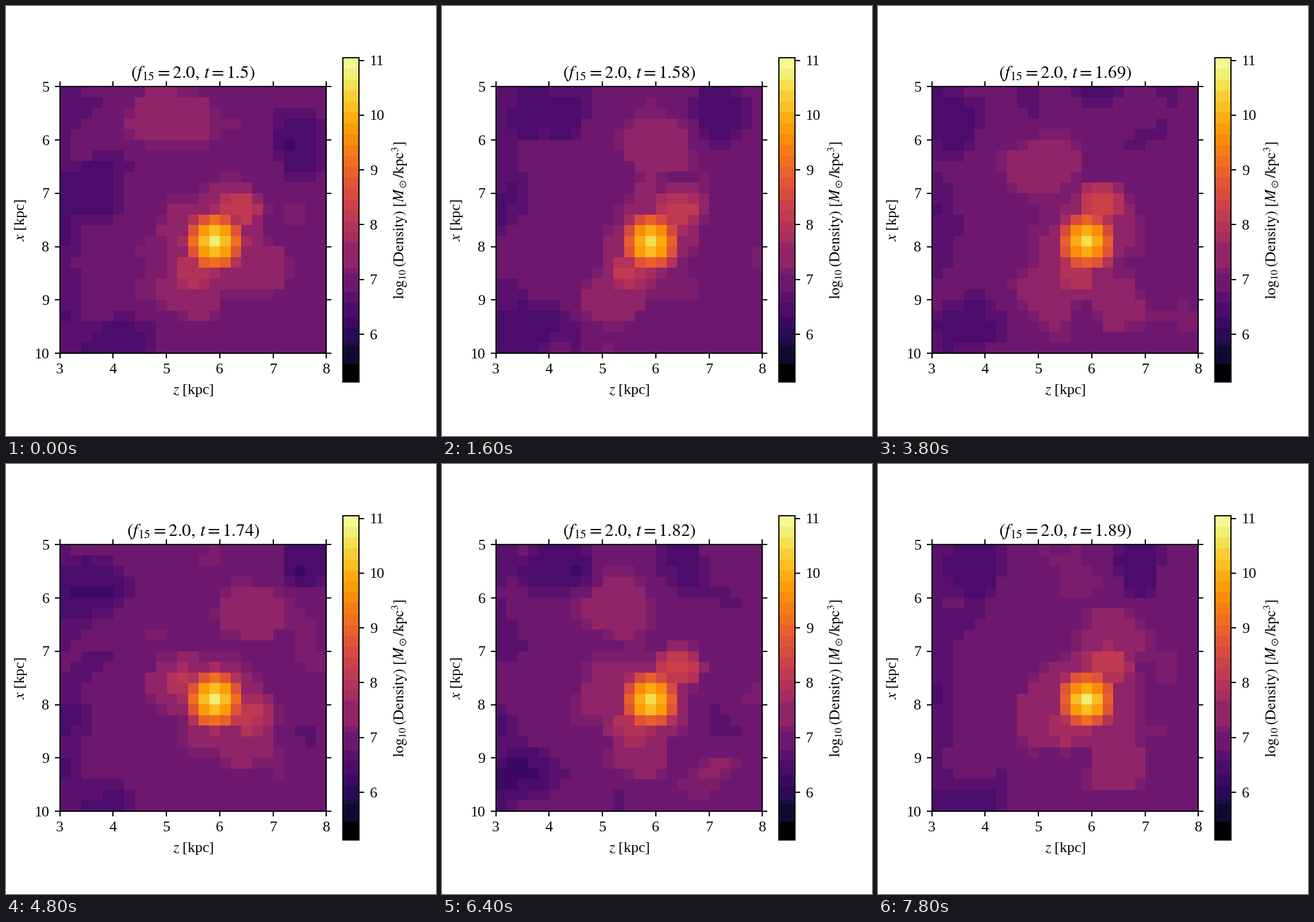
Write a matplotlib script that moves like this. It is 748 by 748 pixels and loops after 8 s.

```python
import numpy as np
import matplotlib.pyplot as plt
from matplotlib.animation import FuncAnimation
from matplotlib.colors import BoundaryNorm, ListedColormap

SIDE, DPI, FRAMES, STEP_MS = 748, 187, 40, 200
N, AMBIENT = 25, 6.94
CORE_Z, CORE_X = 5.9, 7.91

plt.rcParams.update({
    "font.family": "Liberation Serif",
    "mathtext.fontset": "stix",
    "font.size": 10,
})

# Moments at which the drifting structures pass their key points
KEYS = [0, 4, 12, 19, 24, 32, 39]
SPUR_ANGLE = [55, 35, 65, 70, -25, 50, 60]


class Drifter:
    """A flat-topped clump (+) or void (-) that follows a path of (z, x) points."""

    def __init__(self, amp, rz, rx, path):
        self.amp, self.rz, self.rx = amp, rz, rx
        self.z, self.x = zip(*path)

    def field(self, k):
        z, x = np.interp(k, KEYS, self.z), np.interp(k, KEYS, self.x)
        return lobe(self.amp, z, x, self.rz, self.rx)


def lobe(amp, z, x, rz, rx):
    return amp * np.exp(-(((Z - z) / rz) ** 2 + ((X - x) / rx) ** 2) ** 2)


axis = (np.arange(N) + .5) * 5 / N
Z, X = np.meshgrid(3 + axis, 5 + axis)

DRIFTERS = [
    Drifter(.45, .7, .6, [(4.95, 5.6), (6.2, 5.8), (5.8, 6.4), (5.0, 6.5),
                          (6.6, 6.2), (5.2, 6.2), (6.3, 6.8)]),
    Drifter(.5, .6, .6, [(5.5, 8.9), (5.8, 8.9), (4.6, 9.0), (5.3, 8.8),
                         (6.4, 8.6), (5.7, 8.8), (6.4, 9.0)]),
    Drifter(.43, .5, .6, [(6.8, 8.4), (5.1, 7.9), (6.7, 8.4), (6.5, 8.9),
                          (5.1, 7.7), (4.9, 8.1), (5.0, 8.2)]),
    Drifter(-.5, .8, .65, [(3.5, 6.9), (3.7, 5.5), (3.9, 5.5), (3.3, 5.7),
                           (3.4, 5.8), (4.1, 5.4), (3.6, 5.4)]),
    Drifter(-.52, .9, .55, [(4.0, 9.9), (3.9, 9.7), (3.3, 9.4), (3.7, 9.4),
                            (3.6, 9.9), (3.2, 9.3), (3.5, 9.9)]),
    Drifter(-.5, .5, .65, [(7.5, 6.0), (7.7, 6.0), (6.7, 5.0), (6.1, 4.8),
                           (7.6, 5.1), (6.4, 5.3), (6.9, 5.3)]),
]


def blur(a, axes):
    for ax_ in axes:
        a = (np.roll(a, 1, ax_) + 2 * a + np.roll(a, -1, ax_)) / 4
    return a


# Seeded turbulence, smooth in space and time
TURBULENCE = blur(np.random.default_rng(15).normal(size=(FRAMES, N, N)), (0, 1, 1, 2, 2))
TURBULENCE /= TURBULENCE.std()


def density(k):
    parts = [d.field(k) for d in DRIFTERS]

    # Bright spur across the core, weaker on the far side
    angle = np.radians(np.interp(k, KEYS, SPUR_ANGLE))
    for amp, reach in ((1.35, .75), (1.0, -.65)):
        parts.append(lobe(amp, CORE_Z + reach * np.cos(angle),
                          CORE_X - reach * np.sin(angle), .48, .42))

    # Thin halo around the core, emptier gas at the left edge and in the corners
    r = np.hypot(Z - CORE_Z, X - CORE_X)
    parts += [lobe(.43, CORE_Z, CORE_X, 1.0, 1.05),
              -.32 * np.exp(-((Z - 3) / .55) ** 2),
              -.12 * np.clip(r - 2.6, 0, 1.5)]
    parts = np.array(parts)
    gas = AMBIENT + np.maximum(parts, 0).max(0) + np.minimum(parts, 0).min(0)
    gas += .09 * TURBULENCE[k]

    peak = 10.66 + .1 * np.cos(np.pi * k / 6)
    return np.maximum(gas, peak - .58 * (5 * r) ** 1.5)


# Broad bands at low density, even ones above
EDGES = np.concatenate([
    [5.125, 5.47, 5.79, 5.87, 6.11, 6.32, 6.58, 6.77, 7.1, 7.21, 7.67],
    np.linspace(7.86, 11.05, 17)])
levels = ((EDGES[1:] + EDGES[:-1]) / 2 - EDGES[0]) / (EDGES[-1] - EDGES[0])
levels[0] = 0
cmap = ListedColormap(plt.get_cmap("inferno")(levels))
norm = BoundaryNorm(EDGES, cmap.N)

fig, ax = plt.subplots(figsize=(SIDE / DPI, SIDE / DPI), dpi=DPI, facecolor="white")
fig.subplots_adjust(left=.125, right=.9, bottom=.125, top=.88)
im = ax.imshow(density(0), cmap=cmap, norm=norm, extent=(3, 8, 10, 5),
               interpolation="nearest")
ax.set_xticks(range(3, 9))
ax.set_yticks(range(5, 11))
ax.tick_params(top=True, right=True)
ax.set_xlabel("$z$ [kpc]", labelpad=4.5)
ax.set_ylabel("$x$ [kpc]")
title = ax.set_title("", fontsize=12, y=1.0, pad=6)

bar = fig.colorbar(im, ax=ax, spacing="proportional", ticks=range(6, 12))
bar.minorticks_off()
bar.set_label(r"$\log_{10}(\mathrm{Density})\ [M_\odot/\mathrm{kpc}^3]$")


def draw(k):
    im.set_data(density(k))
    title.set_text(rf"$(f_{{15}}=2.0,\,t={round(1.5 + k / 100, 2)})$")
    return im, title


anim = FuncAnimation(fig, draw, frames=FRAMES, interval=STEP_MS,
                     repeat=True, repeat_delay=0, blit=False)
plt.show()
```
